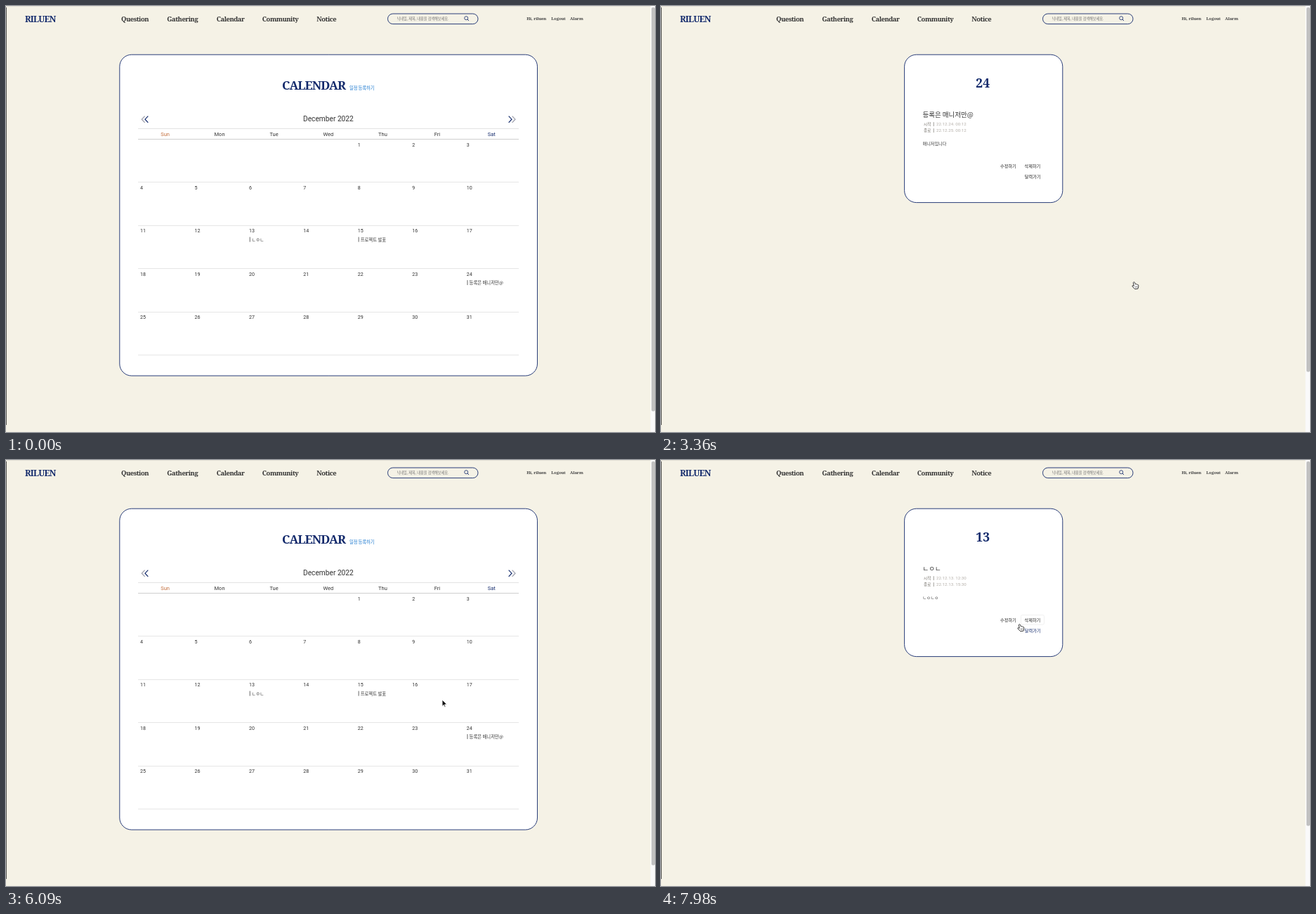
These frames come from a looping animation (924x606 px, 8000 ms). An HTML page with a canvas:

```html
<!DOCTYPE html>
<html lang="ko">
<head>
<meta charset="utf-8">
<title>Calendar</title>
<style>
  html, body { margin: 0; width: 100%; height: 100%; overflow: hidden; background: #f5f2e6; }
  canvas { display: block; width: 924px; height: 606px; }
</style>
</head>
<body>
<canvas id="stage"></canvas>
<script>
const W = 924, H = 606, LOOP = 8000, STEP = 70;
const NAVY = '#12296b', INK = '#333', PAPER = '#f5f2e6';
const SERIF = '"Noto Serif", serif';
const SANS = 'Roboto, sans-serif';
const KR = '"Noto Sans CJK KR", "Noto Sans CJK", sans-serif';

const canvas = document.getElementById('stage');
const ctx = canvas.getContext('2d');
const dpr = window.devicePixelRatio || 1;
canvas.width = W * dpr;
canvas.height = H * dpr;

const COL = 77.45, ROW = 61.4;
const EVENTS = [
  { day: 13, text: 'ㄴㅇㄴ' },
  { day: 15, text: '프로젝트 발표' },
  { day: 24, text: '등록은 매니저만@' }
];
const DETAILS = {
  24: { title: '등록은 매니저만@', start: '22.12.24. 00:12', end: '22.12.25. 00:12', body: '매니저입니다' },
  13: { title: 'ㄴㅇㄴ', start: '22.12.13. 12:30', end: '22.12.13. 15:30', body: 'ㄴㅇㄴㅇ' }
};

// Pointer path: time, x, y of the hot spot
const PATH = [
  [1470, 447, 570], [1750, 548, 455], [2030, 650, 380], [2100, 656, 387],
  [2240, 656, 387], [2380, 673, 386], [2660, 673, 386], [2730, 673, 389],
  [2870, 673.5, 392.5], [3570, 673.5, 392.5], [3710, 657, 365], [4200, 515, 143],
  [4410, 483, 92], [4480, 480, 92], [4900, 458, 110], [5390, 458, 110],
  [5530, 480, 136], [5880, 616, 290], [6020, 629, 338], [6090, 621, 341],
  [6230, 535, 328], [6790, 356.5, 328], [7140, 356.5, 328], [7280, 376, 317],
  [7770, 522, 230], [7910, 514, 233], [7980, 510.5, 233.5]
];
const HAND = [[2730, 3640], [4830, 5460], [6160, 6370], [6650, 7210], [7770, LOOP]];

function pointerAt(t) {
  if (t < PATH[0][0]) return null;
  const i = PATH.findIndex(k => k[0] > t);
  if (i < 0) return PATH[PATH.length - 1].slice(1);
  const [t0, x0, y0] = PATH[i - 1], [t1, x1, y1] = PATH[i];
  const p = (t - t0) / (t1 - t0);
  return [x0 + (x1 - x0) * p, y0 + (y1 - y0) * p];
}

function text(s, x, y, size, { font = KR, color = INK, weight = 400, align = 'left', gap = 0 } = {}) {
  ctx.font = `${weight} ${size}px ${font}`;
  ctx.letterSpacing = gap + 'px';
  ctx.textAlign = align;
  ctx.fillStyle = color;
  ctx.fillText(s, x, y);
}

function rect(x, y, w, h, color) {
  ctx.fillStyle = color;
  ctx.fillRect(x, y, w, h);
}

function roundBox(x, y, w, h, r, fill, stroke, width = 1) {
  ctx.beginPath();
  ctx.roundRect(x, y, w, h, r);
  ctx.fillStyle = fill;
  ctx.fill();
  ctx.strokeStyle = stroke;
  ctx.lineWidth = width;
  ctx.stroke();
}

function line(points, color, width) {
  ctx.beginPath();
  points.forEach(([x, y]) => ctx.lineTo(x, y));
  ctx.strokeStyle = color;
  ctx.lineWidth = width;
  ctx.stroke();
}

function chevron(x, dir, color) {
  line([[x + 4.3 * dir, 156.6], [x, 161.2], [x + 4.3 * dir, 165.8]], color, 1.2);
}

function drawHeader() {
  text('RILUEN', 27, 22.8, 12.2, { font: SERIF, weight: 700, color: NAVY, gap: -0.75 });
  const nav = { font: SERIF, weight: 700, gap: -0.45 };
  [['Question', 164], ['Gathering', 229.3], ['Calendar', 299.7], ['Community', 364.8], ['Notice', 442.3]]
    .forEach(([s, x]) => text(s, x, 21.6, 9.4, nav));

  roundBox(543.5, 11, 128.5, 14.6, 7.3, PAPER, NAVY, 0.9);
  text('닉네임, 제목, 내용을 검색해보세요.', 556.5, 20.2, 5.15, { color: '#707070' });
  ctx.beginPath();
  ctx.arc(655.2, 17.2, 2.5, 0, Math.PI * 2);
  ctx.strokeStyle = NAVY;
  ctx.lineWidth = 0.8;
  ctx.stroke();
  line([[657, 19], [659, 21]], NAVY, 0.9);

  const user = { font: SERIF, weight: 700, color: '#444', gap: -0.12 };
  [['Hi, riluen', 741.3], ['Logout', 776.3], ['Alarm', 803]]
    .forEach(([s, x]) => text(s, x, 20.2, 6, user));
}

function drawFrame(thumbEnd) {
  rect(0, 0, W, H, PAPER);
  rect(0, 0, W, 1, '#e2dfd5');
  rect(0, 2, 1, 594, '#5c5b58');
  rect(917.5, 0, 6.5, H, '#fafafa');
  ctx.beginPath();
  ctx.roundRect(919, 2, 5, thumbEnd - 2, 2);
  ctx.fillStyle = '#c1c1c1';
  ctx.fill();
}

function dayCell(day) {
  const n = day + 3;
  return [191 + (n % 7) * COL, 199.6 + Math.floor(n / 7) * ROW];
}

function drawCalendar(pointer) {
  roundBox(161.8, 69.2, 594.7, 456.8, 17, '#fff', NAVY, 0.9);
  text('CALENDAR', 393, 118.6, 17, { font: SERIF, weight: 700, color: NAVY, gap: -0.9 });
  text('일정 등록하기', 489, 118.7, 6.4, { color: '#1f7bd0', gap: -0.2 });

  chevron(193.3, 1, '#9a9ca8');
  chevron(198, 1, NAVY);
  chevron(720, -1, NAVY);
  chevron(725, -1, '#9a9ca8');
  text('December 2022', 458.9, 164, 10.2, { font: SANS, align: 'center' });

  rect(188, 174, 542, 1, '#e3e3e3');
  rect(188, 189, 542, 1, '#cfcfcf');
  ['Sun', 'Mon', 'Tue', 'Wed', 'Thu', 'Fri', 'Sat'].forEach((s, i) => {
    const color = i === 0 ? '#c4703f' : i === 6 ? NAVY : INK;
    text(s, 226.6 + i * COL, 184.5, 7.5, { font: SANS, color, align: 'center' });
  });
  for (let i = 1; i <= 5; i++) rect(188, Math.round(189 + i * ROW), 542, 1, '#e6e6e6');
  for (let day = 1; day <= 31; day++) {
    text(String(day), ...dayCell(day), 7.1, { font: SANS });
  }

  for (const { day, text: label } of EVENTS) {
    const [x, y] = dayCell(day);
    const left = x + 0.5, top = y + 2.7;
    const over = pointer && pointer[0] >= left && pointer[0] <= left + 71 &&
      pointer[1] >= top && pointer[1] <= top + 9.6;
    if (over) rect(left, top, 71, 9.6, '#f2f2f2');
    rect(x + 0.9, y + 6.2, 0.8, 7, '#444');
    text(label, x + 3.9, y + 12.2, 6.35);
  }
}

function drawDetail(day, hover, back) {
  const d = DETAILS[day];
  roundBox(346.6, 69.2, 225.2, 210.4, 17, '#fff', NAVY, 0.9);
  text(String(day), 458.2, 116, 17.6, { font: SERIF, weight: 700, color: NAVY, align: 'center' });
  text(d.title, 372.5, 158.1, 9.5);
  [['시작', d.start, 168], ['종료', d.end, 177]].forEach(([label, when, y]) => {
    text(label, 374, y + 2, 5.6, { color: '#77736c' });
    rect(387.8, y - 2.8, 0.7, 5.8, '#77736c');
    text(when, 392, y + 2.2, 6.2, { font: SANS, color: '#b5b0aa' });
  });
  text(d.body, 372.5, 197.8, 6.15);
  if (hover) roundBox(512.5, 220.5, 33, 13.5, 2, '#fff', '#ececec', 0.8);
  text('수정하기', 483, 229.7, 6.2, { color: '#222' });
  text('삭제하기', 517.5, 229.7, 6.2, { color: '#222' });
  text('달력가기', 517.8, 244.5, 6.2, { color: back ? NAVY : '#222' });
}

const ARROW_SHAPE = new Path2D('M0 0V9.5L2.2 7.4L3.7 10.8L5.1 10.2L3.7 6.9L6.7 6.7Z');
const HAND_SHAPE = new Path2D(
  'M-1.2 .9Q-.1 -.6 .9 .7L1.8 3.2Q2.8 2.6 3.4 3.5Q4.3 3 4.8 3.9' +
  'Q6.2 3.7 6.3 5.2L6.2 7.2L5.4 9.7L1.1 10.1L-2.5 6.3Q-2.8 4.9 -1.3 5.2L-.2 5.8Z');

function drawPointer([x, y], hand) {
  ctx.save();
  ctx.translate(x, y);
  ctx.lineJoin = 'round';
  ctx.lineWidth = 0.9;
  ctx.fillStyle = hand ? '#fff' : '#111';
  ctx.strokeStyle = hand ? '#222' : '#fff';
  const shape = hand ? HAND_SHAPE : ARROW_SHAPE;
  ctx.fill(shape);
  ctx.stroke(shape);
  if (hand) {
    ctx.lineWidth = 0.5;
    ctx.stroke(new Path2D('M1.5 6.2L1.9 8.3M3 6L3.3 8.1M4.5 5.8L4.6 7.9'));
  }
  ctx.restore();
}

function render(ms) {
  const t = Math.floor((ms % LOOP) / STEP) * STEP;
  const pointer = pointerAt(t);
  const day = t >= 7140 ? 13 : t >= 3360 && t < 5320 ? 24 : 0;
  ctx.setTransform(dpr, 0, 0, dpr, 0, 0);
  drawFrame(day ? 520.5 : 576.5);
  drawHeader();
  if (day) drawDetail(day, t >= 7770, t >= 7980);
  else drawCalendar(pointer);
  if (pointer) drawPointer(pointer, HAND.some(([a, b]) => t >= a && t < b));
}

const begin = performance.now();
function tick() {
  render(performance.now() - begin);
  requestAnimationFrame(tick);
}
tick();
</script>
</body>
</html>
```
